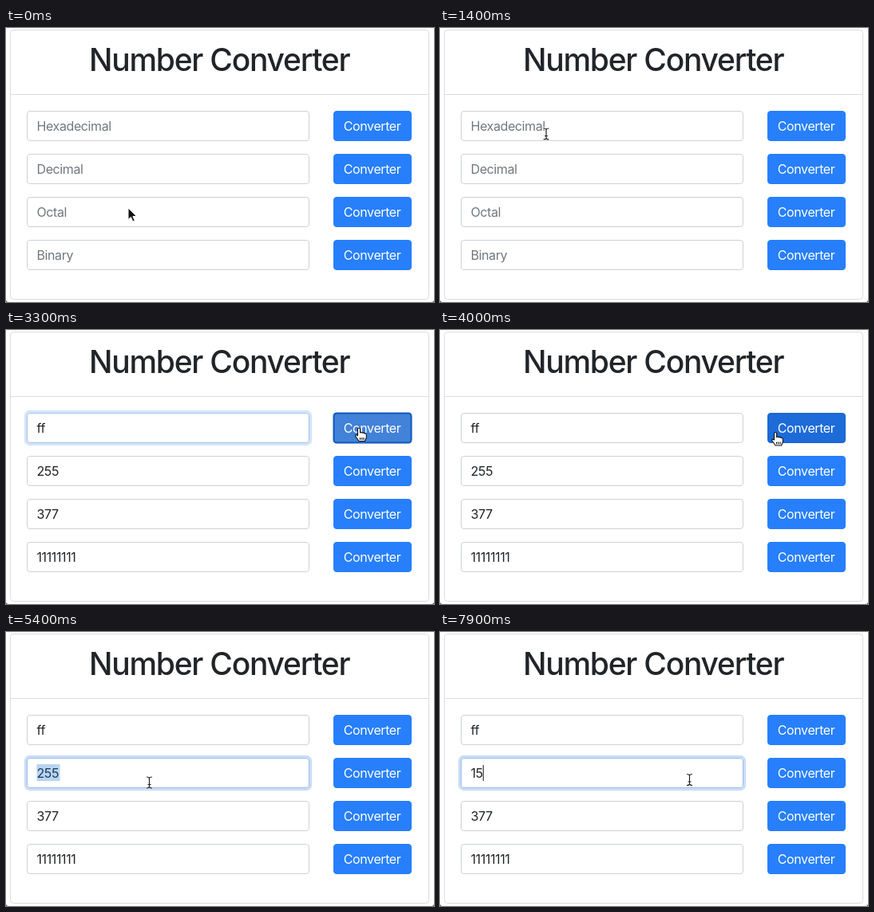
Animation of 536 by 344 pixels, one loop 8000 ms. Source, as an HTML page:

```html
<!DOCTYPE html>
<html lang="en">
<head>
<meta charset="utf-8">
<title>Number Converter</title>
<style>
  html, body { margin: 0; width: 100%; height: 100%; overflow: hidden; background: #fff; }
  svg { display: block; width: 536px; height: 344px; font: 400 16px Inter, "Open Sans", sans-serif; letter-spacing: -.4px; }
  .title { font-size: 39px; font-weight: 500; letter-spacing: -1.25px; fill: #212529; }
  .line { fill: none; stroke: #dcdcde; }
  .field { fill: #fff; }
  .ring { fill: none; stroke: #cbddf6; stroke-width: 3.2; }
  .selection { fill: #b8d4f1; }
  .label { fill: #fff; }
  .caret { fill: #111; }
</style>
</head>
<body>
<svg id="stage" viewBox="0 0 536 344">
  <path d="M0 341V344H3Q0 344 0 341ZM536 341V344H533Q536 344 536 341Z" fill="#444"/>
  <rect class="line" x="5.5" y="2.5" width="524" height="338" rx="4"/>
  <path class="line" d="M6 83.5H529"/>
  <text class="title" x="104" y="54">Number Converter</text>
  <g id="rows"></g>
  <g id="pointer">
    <path id="arrow" d="M0 0V14.5L3.4 11.4L5.8 17L8.3 15.9L5.9 10.5H10.4Z" fill="#111" stroke="#fff"/>
    <g id="beam" fill="none">
      <path d="M-3.5-7Q-.5-7 0-5.5Q.5-7 3.5-7M0-5.5V5.5M-3.5 7Q-.5 7 0 5.5Q.5 7 3.5 7M-2 2.5H2" stroke="#fff" stroke-width="3" opacity=".7"/>
      <path d="M-3.5-7Q-.5-7 0-5.5Q.5-7 3.5-7M0-5.5V5.5M-3.5 7Q-.5 7 0 5.5Q.5 7 3.5 7M-2 2.5H2" stroke="#222" stroke-width="1.2"/>
    </g>
    <path id="hand" d="M-1.5 1Q0-1 1.5 1V6Q3 4.7 4.3 6.3Q6 5.3 7 7Q9 6.5 9.3 8.5V12L7.5 16.5H0L-4.5 10Q-4.5 7.5-1.5 9.5ZM1.5 12V15M3.8 12V15M6 12V15" fill="#fff" stroke="#111" stroke-width="1.1" stroke-linejoin="round"/>
  </g>
</svg>
<script>
const DURATION = 8000;
const $ = id => document.getElementById(id);

function add(parent, tag, attrs, text = '') {
  const node = document.createElementNS('http://www.w3.org/2000/svg', tag);
  for (const key in attrs) node.setAttribute(key, attrs[key]);
  node.textContent = text;
  return parent.appendChild(node);
}

const rows = ['Hexadecimal', 'Decimal', 'Octal', 'Binary'].map((hint, i) => {
  const g = add($('rows'), 'g', { transform: `translate(0 ${104 + 54 * i})` });
  return {
    hint,
    ring: add(g, 'rect', { class: 'ring', x: 24.4, y: -1.6, width: 357.2, height: 41.2, rx: 5.6 }),
    field: add(g, 'rect', { class: 'field', x: 26.5, y: .5, width: 353, height: 37, rx: 3.5 }),
    selection: add(g, 'rect', { class: 'selection', x: 38.5, y: 8, width: 29, height: 21 }),
    text: add(g, 'text', { x: 38.5, y: 25 }),
    caret: add(g, 'rect', { class: 'caret', y: 9, width: 1, height: 20 }),
    button: add(g, 'rect', { x: 410.5, y: .5, width: 97, height: 37, rx: 3.5 }),
    label: add(g, 'text', { class: 'label', x: 422.8, y: 25 }, 'Converter')
  };
});

// time, x, y
const route = [
  [100, 153, 226], [900, 134, 134], [1300, 134, 134], [1400, 133, 133], [2350, 133, 133],
  [2600, 368, 118], [2950, 442, 123], [3850, 442, 123], [4700, 179.5, 189],
  [7600, 179.5, 189], [7900, 312.5, 185.5], [8000, 348, 183]
];

// latest entry whose time has come
const at = (steps, t) => steps.reduce((value, [start, next]) => t >= start ? next : value, '');
const ramp = (t, start, length = 150) => Math.min(1, Math.max(0, (t - start) / length));
const smooth = p => p * p * (3 - 2 * p);
const show = (node, on) => node.style.display = on ? '' : 'none';
const mix = (a, b, p) => `rgb(${a.map((v, i) => Math.round(v + (b[i] - v) * p))})`;

function position(t) {
  let i = 1;
  while (i < route.length - 1 && t > route[i][0]) i++;
  const [start, x, y] = route[i - 1], [end, x2, y2] = route[i];
  const p = smooth(ramp(t, start, end - start));
  return [x + (x2 - x) * p, y + (y2 - y) * p];
}

function render(t) {
  const [x, y] = position(t);
  const hovered = rows.findIndex((_, i) => y >= 104 + 54 * i && y < 142 + 54 * i);
  const overButton = hovered >= 0 && x >= 410 && x < 508;
  const overField = hovered >= 0 && x >= 26 && x < 380 && t > 200;

  const values = [
    at([[2100, 'f'], [2300, 'ff']], t),
    at([[3250, '255'], [7000, '1'], [7450, '15']], t),
    t >= 3250 ? '377' : '',
    t >= 3250 ? '11111111' : ''
  ];
  const focus = [ramp(t, 1600) - ramp(t, 3270), ramp(t, 4800), 0, 0];
  const selected = t >= 5000 && t < 7000;
  const active = t >= 1600 && t < 3200 ? 0 : t >= 4790 && !selected ? 1 : -1;
  const lastInput = at([[1600, 1600], [2100, 2100], [2300, 2300], [4790, 4790], [7000, 7000], [7450, 7450]], t);
  const caretOn = (t - lastInput) % 1000 < 500;
  const pressed = t >= 3200 && t < 3450;

  rows.forEach((row, i) => {
    const value = values[i], marked = i === 1 && selected;
    row.ring.style.opacity = focus[i];
    row.field.style.stroke = mix([206, 209, 214], [151, 187, 234], focus[i]);
    row.text.textContent = value || row.hint;
    row.text.style.fill = marked ? '#1c3d5e' : value ? '#202428' : '#71777e';
    show(row.selection, marked);
    show(row.caret, i === active && caretOn);
    row.caret.setAttribute('x', 38.5 + (value ? row.text.getComputedTextLength() : 0));
    const down = pressed && i === 0, hot = overButton && hovered === i;
    row.button.style.fill = down ? '#4282d8' : hot ? '#1c6bd8' : '#277ffb';
    row.button.style.stroke = down ? '#0c58bd' : hot ? '#1a64cb' : '#277ffb';
    row.button.style.strokeWidth = down ? 2 : 1;
  });

  const typing = t >= 2100 && t < 2350 || t >= 7000 && t < 7600;
  show($('pointer'), !typing);
  show($('hand'), overButton);
  show($('beam'), overField);
  show($('arrow'), !overButton && !overField);
  $('pointer').setAttribute('transform', `translate(${x} ${y})`);
}

const begin = performance.now();
function tick() {
  render((performance.now() - begin) % DURATION);
  requestAnimationFrame(tick);
}
tick();
</script>
</body>
</html>
```
